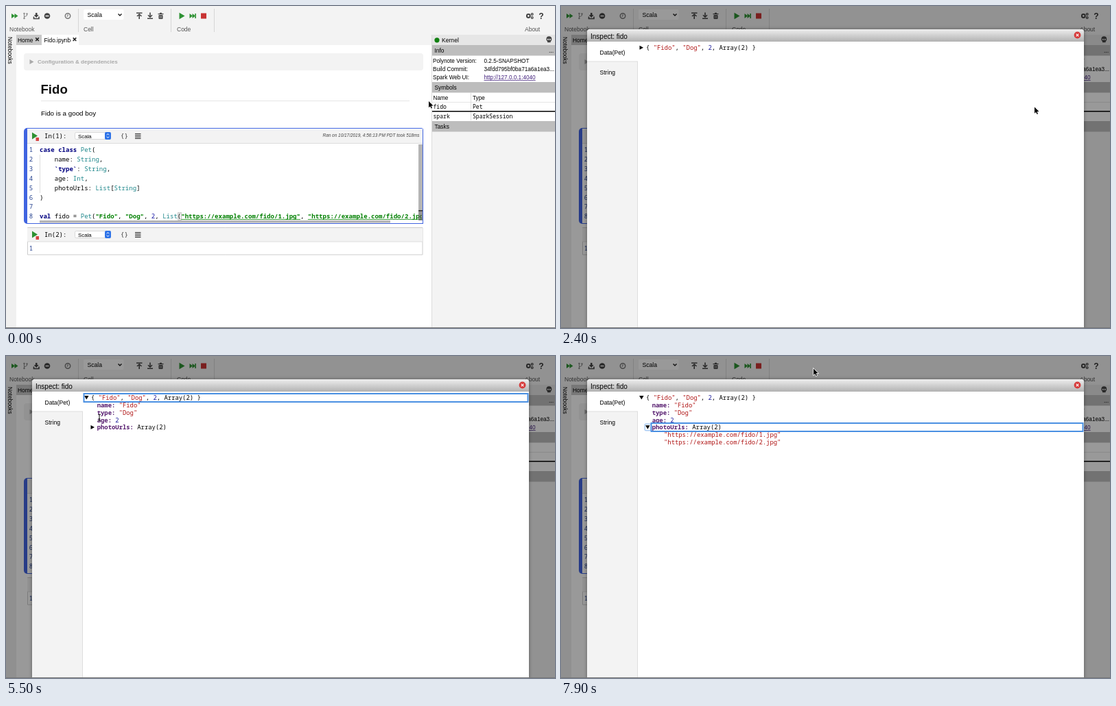
An HTML page with a canvas that plays this animation: 800x470 px, repeating every 8000 ms.

```html
<!DOCTYPE html>
<html lang="en">
<head>
<meta charset="utf-8">
<title>Notebook inspector</title>
<style>
html, body { margin: 0; width: 100%; height: 100%; overflow: hidden; background: #fff; }
canvas { display: block; width: 800px; height: 470px; }
</style>
</head>
<body>
<canvas id="stage" width="800" height="470"></canvas>
<script>
const ctx = document.getElementById('stage').getContext('2d');
const LOOP = 8000, STEP = 100;
const SANS = '"Liberation Sans", Arial, sans-serif';
const MONO = '"Noto Sans Mono", "DejaVu Sans Mono", monospace';
const KEYWORD = '#000080', TYPE = '#20888c', STRING = '#008000', INK = '#000', ICON = '#444', GREEN = '#2d9132';

// --- Drawing helpers ---
function box(x, y, w, h, fill, stroke, lineWidth = 1, radius = 0) {
  ctx.beginPath();
  ctx.roundRect(x, y, w, h, radius);
  if (fill) { ctx.fillStyle = fill; ctx.fill(); }
  if (stroke) { ctx.strokeStyle = stroke; ctx.lineWidth = lineWidth; ctx.stroke(); }
}

function path(points, stroke, lineWidth = 1, fill) {
  ctx.beginPath();
  points.forEach(([x, y], i) => i ? ctx.lineTo(x, y) : ctx.moveTo(x, y));
  if (fill) { ctx.closePath(); ctx.fillStyle = fill; }
  if (stroke) { ctx.strokeStyle = stroke; ctx.lineWidth = lineWidth; ctx.stroke(); }
  if (fill) ctx.fill();
}

function disc(x, y, r, fill, stroke, lineWidth = 1) {
  ctx.beginPath();
  ctx.arc(x, y, r, 0, Math.PI * 2);
  if (fill) { ctx.fillStyle = fill; ctx.fill(); }
  if (stroke) { ctx.strokeStyle = stroke; ctx.lineWidth = lineWidth; ctx.stroke(); }
}

const line = (x1, y1, x2, y2, color, width) => path([[x1, y1], [x2, y2]], color, width);
const right = (x, y, w, h, color) => path([[x, y - h / 2], [x + w, y], [x, y + h / 2]], null, 0, color);
const down = (x, y, w, h, color) => path([[x - w / 2, y - h / 2], [x + w / 2, y - h / 2], [x, y + h / 2]], null, 0, color);

function text(str, x, y, size = 8.4, color = INK, style = '', family = SANS, align = 'left') {
  ctx.font = `${style} ${size}px ${family}`;
  ctx.fillStyle = color;
  ctx.textAlign = align;
  ctx.fillText(str, x, y);
  return ctx.measureText(str).width;
}

// Each run is [text, color, bold, underlined].
function mono(x, y, size, ...runs) {
  for (const [str, color = INK, bold, underlined] of runs) {
    const w = text(str, x, y, size, color, bold ? 'bold' : '', MONO);
    if (underlined) box(x, y + 1, w, .8, color);
    x += w;
  }
}

// --- Notebook page ---
function drawToolbar() {
  box(0, 0, 800, 42, '#f3f3f3');
  for (const x of [105, 240, 303]) box(x, 4, 1, 34, '#d6d6d6');
  [['Notebook', 5], ['Cell', 113], ['Code', 249], ['About', 756]]
    .forEach(([label, x]) => text(label, x, 36.5, 8.5, '#555'));

  right(8, 14.5, 5, 7, GREEN);
  right(12.5, 14.5, 5, 7, GREEN);

  line(26.5, 11, 26.5, 18, '#888');
  path([[30.5, 12], [30.5, 14], [26.5, 16]], '#888');
  for (const [x, y] of [[26.5, 11], [26.5, 18], [30.5, 11.5]]) disc(x, y, 1.2, '#888');

  box(43, 10, 2.5, 4, ICON);
  down(44.2, 15, 7, 4, ICON);
  path([[40.5, 15.5], [40.5, 18.5], [48, 18.5], [48, 15.5]], ICON, 1.6);

  disc(60, 14.5, 4.3, ICON);
  box(57.5, 13.8, 5, 1.5, '#f3f3f3');
  disc(90, 14.5, 3.7, null, '#777', 1.5);
  path([[90, 12], [90, 15], [88.5, 15]], '#777');

  box(113, 5, 58.5, 15, '#fff', null, 0, 2);
  text('Scala', 118.5, 15.5, 8.6);
  path([[163.5, 11.5], [166, 14], [168.5, 11.5]], '#222', 1.5);

  box(190, 9.5, 8.5, 1.5, ICON);
  path([[191, 15], [194.2, 12], [197.5, 15]], ICON, 1.5);
  line(194.2, 12, 194.2, 19, ICON, 1.6);
  line(210, 9.5, 210, 16, ICON, 1.6);
  path([[207, 13.3], [210, 16.3], [213, 13.3]], ICON, 1.5);
  box(206, 17.5, 8, 1.5, ICON);

  box(221.5, 11, 8, 1.2, ICON);
  box(224, 9.8, 3, 1.2, ICON);
  box(222.5, 13, 6, 6, ICON, null, 0, 1);
  line(224.5, 14, 224.5, 18, '#ccc', .7);
  line(226.5, 14, 226.5, 18, '#ccc', .7);

  right(252.5, 14.5, 8, 9.5, GREEN);
  right(267.5, 14.5, 4.5, 7, GREEN);
  right(271.5, 14.5, 4.5, 7, GREEN);
  box(275.3, 11, 1.6, 7, GREEN);
  box(284, 10.5, 8, 8, '#c93434');

  disc(761.3, 14.5, 2.4, null, ICON, 2);
  disc(766.7, 12, 1.4, null, ICON, 1.2);
  disc(766.7, 17, 1.4, null, ICON, 1.2);
  text('?', 776.3, 18.5, 12, '#333', 'bold');
}

function drawTabs() {
  box(0, 42, 15, 428, '#f0f0f0');
  ctx.save();
  ctx.translate(2.5, 45);
  ctx.rotate(Math.PI / 2);
  text('Notebooks', 0, 0, 8.3);
  ctx.restore();
  box(15, 42, 605, 15, '#f3f3f3');
  box(15, 42, 37, 15, '#c8c8c8');
  box(52, 42, 54, 15, '#fff');
  text('Home', 17, 52.5);
  text('Fido.ipynb', 55.5, 52.5);
  for (const x of [45.5, 100]) {
    line(x - 2.3, 46.4, x + 2.3, 51, '#222', 1.5);
    line(x + 2.3, 46.4, x - 2.3, 51, '#222', 1.5);
  }
}

function drawCellHeader(y, label) {
  box(31, y, 576, 20, '#f3f3f3');
  right(38, y + 9.5, 8, 10, GREEN);
  box(43.5, y + 12, 4.5, 5, '#d64545');
  mono(56, y + 13, 9, [label]);
  box(100.5, y + 4.5, 52, 10, '#fff', '#d8d8d8', 1, 2);
  text('Scala', 105, y + 12.5, 7.9);
  box(144, y + 4, 9, 11, '#2f74e8', null, 0, 2);
  path([[146.8, y + 8.3], [148.5, y + 6.5], [150.2, y + 8.3]], '#fff');
  path([[146.8, y + 10.7], [148.5, y + 12.5], [150.2, y + 10.7]], '#fff');
  mono(167, y + 13, 9, ['{}', '#333']);
  for (let i = 0; i < 4; i++) box(188, y + 6 + i * 2.3, 8.5, 1.1, '#333');
}

const CODE = [
  [['case class ', KEYWORD, true], ['Pet', TYPE], ['(']],
  [['    name: '], ['String', TYPE], [',']],
  [['    '], ['`type`', KEYWORD, true], [': '], ['String', TYPE], [',']],
  [['    age: '], ['Int', TYPE], [',']],
  [['    photoUrls: '], ['List', TYPE], ['['], ['String', TYPE], [']']],
  [[')']],
  [],
  [['val', KEYWORD, true], [' fido = '], ['Pet', TYPE], ['('], ['"Fido"', STRING, true], [', '],
    ['"Dog"', STRING, true], [', '], ['2', '#1a1aa6'], [', '], ['List', TYPE], ['('],
    ['"https://example.com/fido/1.jpg"', STRING, true, true], [', '],
    ['"https://example.com/fido/2.jpg"', STRING, true, true]]
];

function drawNotebook() {
  box(26, 69, 582, 25, '#f3f3f3', null, 0, 4);
  right(34.5, 81.5, 6, 7, '#aaa');
  text('Configuration & dependencies', 46, 84.3, 8.05, '#a9a9a9', 'bold');
  text('Fido', 50.5, 128, 18.6, '#111', 'bold');
  box(51, 138, 537, 1, '#e6e6e6');
  text('Fido is a good boy', 51, 160, 9.8);

  box(26, 178, 582, 140, '#4064e0', null, 0, [5, 3, 0, 5]);
  box(31, 179, 576, 138, '#fff');
  drawCellHeader(180, 'In(1):');
  box(31, 200, 576, 1, '#ddd');
  text('Ran on 10/17/2019, 4:56:13 PM PDT took 518ms', 602.5, 191.3, 6.45, '#444', 'italic', SANS, 'right');
  box(49, 217, 1, 56, '#ddd');
  box(250.5, 301.5, 5, 11, '#eee', '#bbb', .8);

  ctx.save();
  ctx.beginPath();
  ctx.rect(31, 201, 575, 115);
  ctx.clip();
  CODE.forEach((runs, i) => {
    const y = 213 + i * 13.9;
    mono(33.7, y, 9, [String(i + 1), '#24408e']);
    mono(49, y, 9.05, ...runs);
  });
  ctx.restore();
  box(601, 202, 6, 96, '#b5b5b5');
  box(601, 298, 6, 15, 'rgba(90,90,90,.65)');
  box(601, 298, 6, 1.5, '#333');
  box(49, 313, 511, 3.5, '#b5b5b5');

  box(31.5, 323.5, 575.5, 39.5, '#fff', '#ccc');
  drawCellHeader(324, 'In(2):');
  box(31, 343.5, 576, 1, '#ddd');
  mono(33.7, 357, 9, ['1', '#24408e']);
}

function drawKernel() {
  box(620, 42, 180, 428, '#f3f3f3');
  box(620, 72, 180, 96, '#fff');
  box(620, 42, 180, 15, '#e6e6e6');
  disc(628, 49.8, 3.6, '#118011');
  text('Kernel', 635, 52.5, 8.6);
  disc(791.3, 48.2, 3.9, '#444');
  box(789, 50, 4.6, 3.2, '#444');
  disc(789.8, 48.8, 1.1, '#e6e6e6');
  disc(792.8, 48.8, 1.1, '#e6e6e6');

  [['Info', 57], ['Symbols', 111], ['Tasks', 168]].forEach(([title, y]) => {
    box(620, y, 180, 15.5, '#bdbdbd');
    text(title, 624.5, y + 11, 8.4);
  });
  text('...', 791, 67.5, 8.5);
  text('Polynote Version:', 622, 82.5, 8.2);
  text('0.2.5-SNAPSHOT', 696.5, 82.5, 8.2);
  text('Build Commit:', 622, 94.7, 8.2);
  text('34fdd795bf0ba71a6a1ea3...', 696.5, 94.7, 8.2);
  text('Spark Web UI:', 622, 107, 8.2);
  box(696.5, 108, text('http://127.0.0.1:4040', 696.5, 107, 8.2, '#42207c'), .8, '#42207c');

  text('Name', 622.5, 137, 8.2);
  text('Type', 680, 137, 8.2);
  box(620, 140, 180, .8, '#ddd');
  box(677, 126, 1, 41, '#ddd');
  mono(622.5, 150, 8.1, ['fido']);
  mono(680, 150, 8.1, ['Pet']);
  box(620, 153, 180, 1.5, '#000');
  mono(622.5, 164, 8.1, ['spark']);
  mono(680, 164, 8.1, ['SparkSession']);
  box(620, 42, 1, 428, '#dcdcdc');
}

// --- Inspector dialog ---
const RED = '#b01515', BLUE = '#1c1c9c', PURPLE = '#551a6e', FOCUS = '#4a90e2';

function drawDialog(t) {
  box(0, 0, 800, 470, 'rgba(0,0,0,.4)');
  ctx.save();
  ctx.shadowColor = 'rgba(0,0,0,.4)';
  ctx.shadowBlur = 5;
  box(38, 34, 724, 440, '#fff', null, 0, [4, 4, 0, 0]);
  ctx.restore();
  const shade = ctx.createLinearGradient(0, 34, 0, 52);
  shade.addColorStop(0, '#eee');
  shade.addColorStop(1, '#b2b2b2');
  box(38, 34, 724, 18, shade, null, 0, [4, 4, 0, 0]);
  text('Inspect: fido', 43, 48, 10);
  disc(752.5, 42.5, 4.9, '#d63a3a');
  line(750.6, 40.6, 754.4, 44.4, '#fff', 1.2);
  line(754.4, 40.6, 750.6, 44.4, '#fff', 1.2);
  box(38, 81, 74, 389, '#f3f3f3');
  box(38, 80.5, 74, 1, '#ddd');
  box(111, 81, 1, 389, '#ddd');
  text('Data(Pet)', 56.5, 71, 8.6);
  text('String', 56.5, 100, 8.6);

  const open = t >= 4900, urlsOpen = t >= 6300;
  const row = (i, x, ...runs) => mono(x, 64 + i * 10.85, 8.9, ...runs);
  if (open) down(117.3, 60.8, 6.5, 5.5, '#000');
  else right(114.5, 60.8, 5.5, 6, '#000');
  row(0, 124, ['{ '], ['"Fido"', RED], [', '], ['"Dog"', RED], [', '], ['2', BLUE], [', Array(2) }']);
  if (open) {
    row(1, 132.7, ['name:', PURPLE, true], [' '], ['"Fido"', RED]);
    row(2, 132.7, ['type:', PURPLE, true], [' '], ['"Dog"', RED]);
    row(3, 132.7, ['age:', PURPLE, true], [' '], ['2', BLUE]);
    if (t >= 6100) box(121.5, 98.5, 10, 11, '#a9cbf4', null, 0, 2);
    if (urlsOpen) {
      box(123, 100, 7.5, 8, '#fff');
      down(126.3, 104, 6.5, 5.5, '#000');
    } else right(123.5, 104, 5.5, 6, '#000');
    row(4, 132.7, ['photoUrls:', PURPLE, true], [' Array(2)']);
  }
  if (urlsOpen) [1, 2].forEach(n => row(4 + n, 150, [`"https://example.com/fido/${n}.jpg"`, RED]));
  if (t >= 6100) box(131.5, 98, 629, 12, null, FOCUS, 2);
  else if (t >= 4800) box(113.5, 55, 647, 12, null, FOCUS, 2);
}

// --- Pointer: [time, x, y] ---
const ROUTE = [
  [0, 616, 139], [900, 640, 146], [1800, 688, 147], [2200, 690, 147.5], [3100, 690, 147.5],
  [3500, 265, 97], [3800, 265, 97], [4000, 161, 71], [4100, 161, 71], [4200, 135, 62.5],
  [4500, 117, 60], [5000, 117, 60], [5500, 136, 90], [5700, 136, 93], [6100, 124, 102.5],
  [6300, 124, 102.5], [6500, 209, 120], [6900, 236, 243], [7000, 236, 243], [7900, 368, 18.5]
];
const CLICKS = [[2100, 2200], [4800, 4900], [6100, 6300]];

function pointerAt(t) {
  const i = ROUTE.findIndex(p => p[0] > t);
  if (i < 0) return ROUTE.at(-1).slice(1);
  const [t0, x0, y0] = ROUTE[i - 1], [t1, x1, y1] = ROUTE[i];
  const u = (t - t0) / (t1 - t0), k = u * u * (3 - 2 * u);
  return [x0 + (x1 - x0) * k, y0 + (y1 - y0) * k];
}

function drawPointer(t) {
  const [x, y] = pointerAt(t);
  if (CLICKS.some(([from, to]) => t >= from && t < to)) disc(x, y, 13, null, '#111', 1.1);
  ctx.save();
  ctx.translate(x, y);
  const overSymbol = t < 2400 && x > 621 && y > 140;
  const overText = t >= 4900 && x > 131 && x < 320 && y > 66 && y < (t >= 6300 ? 131 : 110);
  if (overSymbol) {
    line(2, 2, 5.3, 5, '#fff', 4);
    line(2, 2, 5.2, 5, '#111', 2.2);
    disc(-.5, -.5, 3.7, '#fff', '#111', 1.4);
    line(-2.4, -.5, 1.4, -.5, '#111', 1);
    line(-.5, -2.4, -.5, 1.4, '#111', 1);
  } else if (overText) {
    line(0, -4, 0, 4, '#222', 1.1);
    for (const s of [-1, 1]) path([[-2, 5 * s], [0, 4 * s], [2, 5 * s]], '#222', 1);
    line(-1.3, 1.6, 1.3, 1.6, '#222', .9);
  } else {
    path([[0, 0], [0, 9.2], [2.1, 7.3], [3.6, 10.5], [5, 9.9], [3.6, 6.8], [6.5, 6.6]], '#fff', 1.4, '#000');
  }
  ctx.restore();
}

function frame(now) {
  const t = Math.floor(now % LOOP / STEP) * STEP;
  box(0, 0, 800, 470, '#fff');
  drawToolbar();
  drawTabs();
  drawNotebook();
  drawKernel();
  if (t >= 2400) drawDialog(t);
  box(0, 469, 800, 1, '#777');
  drawPointer(t);
}

const start = performance.now();
function tick() {
  frame(performance.now() - start);
  requestAnimationFrame(tick);
}
tick();
</script>
</body>
</html>
```
